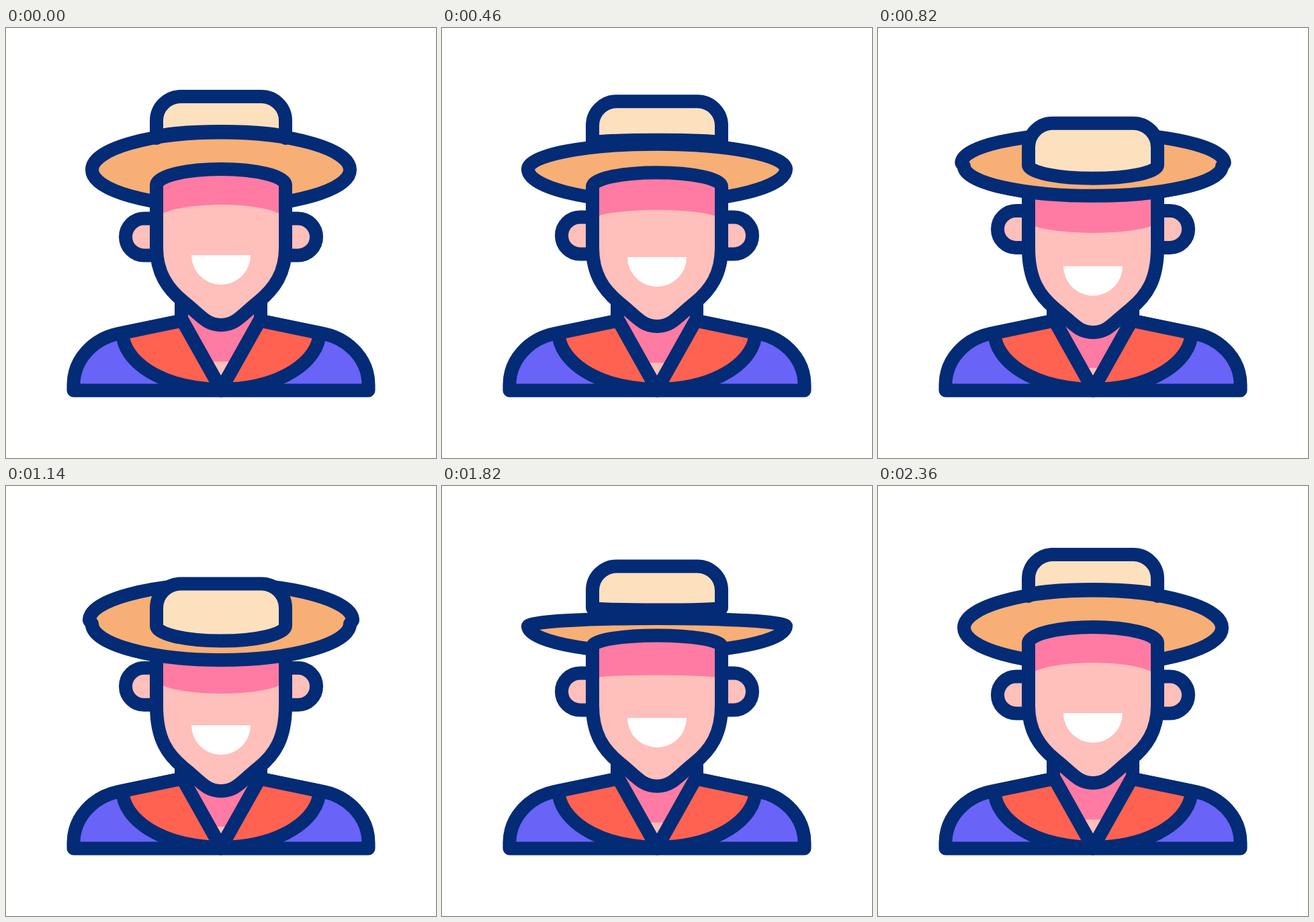
An HTML page that plays this animation: 640 px wide and 640 px high, repeating every 2400 ms.

```html
<!DOCTYPE html>
<html lang="en">
<head>
<meta charset="utf-8">
<title>Nodding man in a hat</title>
<style>
  html, body { margin: 0; width: 100%; height: 100%; overflow: hidden; background: #fff; }
  svg { display: block; width: 100vw; height: 100vh; }
  .line { stroke: #032b76; stroke-width: 20; stroke-linejoin: round; stroke-linecap: round; }
  .skin { fill: #ffbfba; }
  .pink { fill: #ff7ba3; }
  .brim { fill: #f7af75; }
  .crown { fill: #fde0be; }
</style>
</head>
<body>
<svg viewBox="0 0 640 640">
  <path class="skin" d="M261 400H379V436L320 538L261 436Z"/>
  <path class="pink" id="neck"/>
  <path class="line" fill="none" d="M261 408V436M379 408V436"/>
  <g id="ears" class="line skin">
    <path d="M224 283.5H205.5a27.5 27.5 0 0 0 0 55H224Z"/>
    <path d="M416 283.5H434.5a27.5 27.5 0 0 1 0 55H416Z"/>
  </g>
  <path class="line brim" id="under"/>
  <path class="skin" id="face"/>
  <path class="pink" id="shade"/>
  <path fill="#fff" id="mouth"/>
  <path class="line" fill="none" id="outline"/>
  <g class="line" id="half">
    <path fill="#6963f7" d="M100.5 539.5V531C100.5 494 129 463 167 455L262.5 435.5L320 538V539.5Z"/>
    <path fill="#ff6251" d="M173.5 454L262.5 435.5L320 538C228 537 174 494 173.5 454Z"/>
  </g>
  <path class="line brim" id="over"/>
  <path class="line crown" id="crown"/>
</svg>
<script>
const MID = 320;
const el = id => document.getElementById(id);
const set = (id, d) => el(id).setAttribute('d', d);

const half = el('half');
const twin = half.cloneNode(true);
twin.removeAttribute('id');
twin.setAttribute('transform', 'translate(640) scale(-1 1)');
half.after(twin);

// Half an ellipse from MID - a to MID + a; a negative a runs leftwards.
function bow({ a, edge, peak }) {
  const k = 0.5523, h = edge + (peak - edge) * k;
  return `${MID - a} ${edge}C${MID - a} ${h} ${MID - a * k} ${peak} ${MID} ${peak}` +
    `S${MID + a} ${h} ${MID + a} ${edge}`;
}
const back = b => bow({ ...b, a: -b.a });
const lens = (top, bottom) => `M${bow(top)}L${back(bottom)}Z`;

function jaw(d) {
  const [cheek, side, corner, turn, chin] = [364, 388, 408, 428, 442].map(y => y + d);
  return `416 327C416 ${cheek} 400 ${side} 375 ${corner}S342 ${chin} 320 ${chin}` +
    `S290 ${turn} 265 ${corner}S224 ${cheek} 224 327Z`;
}

const ease = x => {
  x = Math.min(1, Math.max(0, x));
  return x < 0.5 ? 8 * x ** 4 : 1 - 8 * (1 - x) ** 4;
};

function draw(t) {
  const p = ease(t / 1215) * (1 - ease((t - 1170) / 1235));
  const go = (up, down) => up + (down - up) * p;

  const tip = go(211, 205);
  const front = { a: 192, edge: tip, peak: go(155.5, 259) };
  const low = { a: 192, edge: tip, peak: go(266, 221) };
  const rear = { a: go(192, 196), edge: go(211, 200), peak: go(266, 146) };
  const band = { a: 96, edge: go(164, 208), peak: go(154, 230.5) };
  const brow = { a: 96, edge: go(234, 246), peak: go(210, 241) };
  const dusk = { a: 96, edge: go(286, 287.5), peak: go(263, 309) };

  const y = go(496.5, 507), w = (538 - y) * 0.56;
  set('neck', `M261 400H379V436L${MID + w} ${y}H${MID - w}L261 436Z`);
  el('ears').setAttribute('transform', `translate(0 ${go(0, -12.7)})`);

  set('under', lens(front, low));
  const head = `M${bow(brow)}L${jaw(go(0, 12))}`;
  set('face', head);
  set('outline', head);
  set('shade', lens(brow, dusk));

  const m = go(338, 356);
  set('mouth', `M276 ${m}H364A44 44 0 0 1 276 ${m}Z`);

  // The upper side of the brim shows once the hat has tipped past edge-on.
  set('over', rear.peak < front.peak ? lens(rear, front) : '');

  const top = go(102, 145.5);
  set('crown', `M224 ${band.edge}V${top + 36}A36 36 0 0 1 260 ${top}` +
    `H380A36 36 0 0 1 416 ${top + 36}L${back(band)}Z`);
}

function tick() {
  draw(performance.now() % 2400);
  requestAnimationFrame(tick);
}
tick();
</script>
</body>
</html>
```
